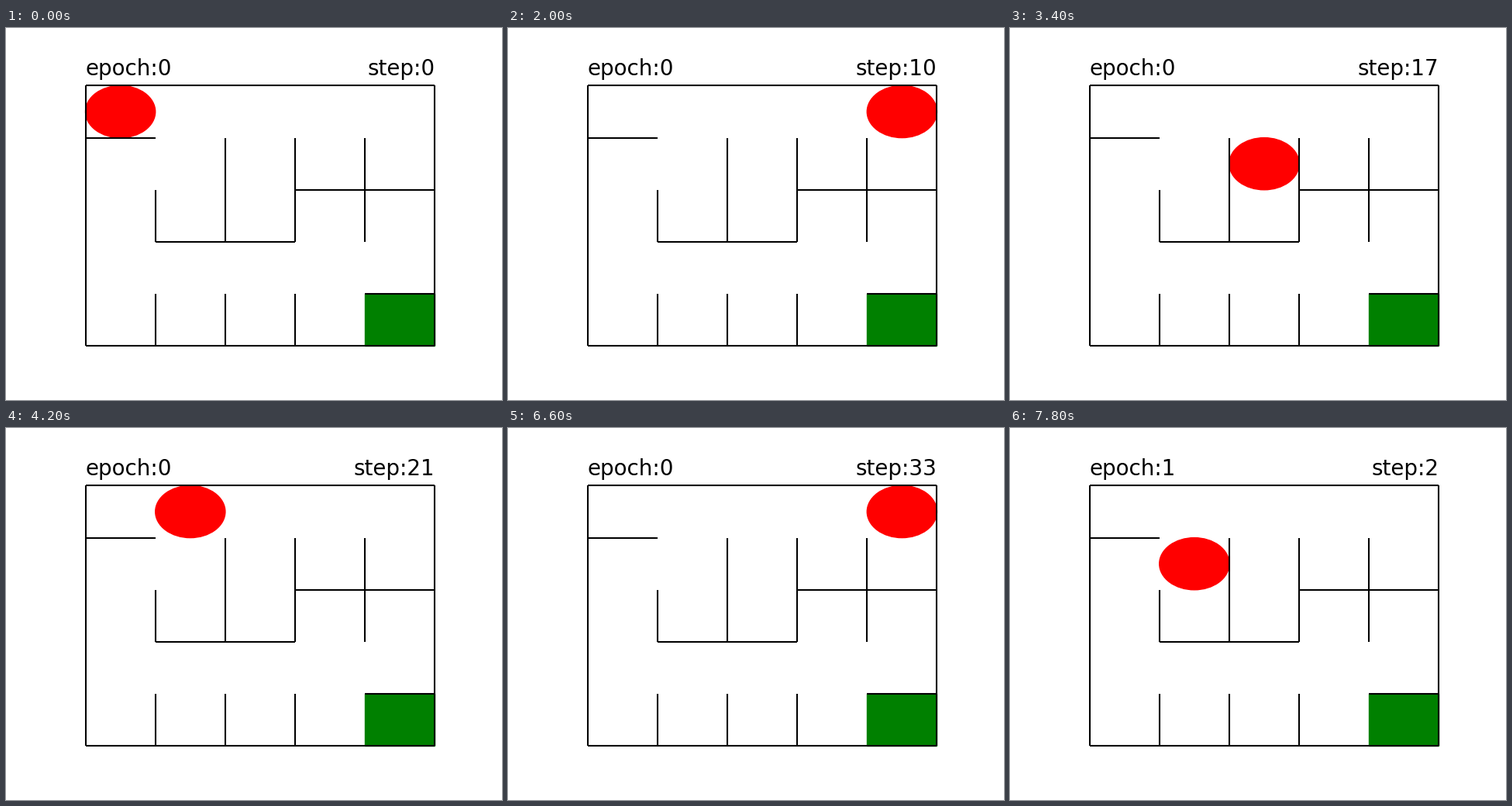
A matplotlib script that plays this animation: 640 px wide and 480 px high, repeating every 8000 ms.

```python
import matplotlib.pyplot as plt
from matplotlib.animation import FuncAnimation
from matplotlib.patches import Circle, Rectangle

SIZE = 5
# One letter per step; "." is a bump into a wall.
EPOCHS = [
    ".R.R.R" "D.URDUL" ".L.D" ".U.L.L." "RRRRD..U..L.",
    "RD",
]
MOVES = {"R": (1, 0), "L": (-1, 0), "D": (0, 1), "U": (0, -1), ".": (0, 0)}

# (fixed coordinate, start, end)
H_WALLS = [(0, 0, 5), (1, 0, 1), (2, 3, 5), (3, 1, 3), (4, 4, 5), (5, 0, 5)]
V_WALLS = [(0, 0, 5), (1, 2, 3), (1, 4, 5), (2, 1, 3), (2, 4, 5),
           (3, 1, 3), (3, 4, 5), (4, 1, 3), (5, 0, 5)]


def walk(epochs):
    """List (epoch, step, column, row) for every state of every epoch."""
    states = []
    for epoch, moves in enumerate(epochs):
        x = y = 0
        states.append((epoch, 0, x, y))
        for step, move in enumerate(moves, 1):
            dx, dy = MOVES[move]
            x, y = x + dx, y + dy
            states.append((epoch, step, x, y))
    return states


STATES = walk(EPOCHS)

plt.rcParams["font.family"] = "DejaVu Sans"
fig = plt.figure(figsize=(6.4, 4.8), dpi=100, facecolor="white")
ax = fig.add_axes([0.125, 0.11, 0.775, 0.77])
ax.set_xlim(-0.05 * SIZE, 1.05 * SIZE)
ax.set_ylim(1.05 * SIZE, -0.05 * SIZE)
ax.axis("off")

ax.add_patch(Rectangle((SIZE - 1, SIZE - 1), 1, 1, color="green"))
agent = ax.add_patch(Circle((0.5, 0.5), 0.5, color="red"))
for y, x0, x1 in H_WALLS:
    ax.hlines(y, x0, x1, color="black", lw=1.5)
for x, y0, y1 in V_WALLS:
    ax.vlines(x, y0, y1, color="black", lw=1.5)

epoch_label = ax.text(0, -0.2, "", fontsize=20, ha="left", va="baseline")
step_label = ax.text(SIZE, -0.2, "", fontsize=20, ha="right", va="baseline")


def draw(i):
    epoch, step, x, y = STATES[i]
    agent.center = (x + 0.5, y + 0.5)
    epoch_label.set_text(f"epoch:{epoch}")
    step_label.set_text(f"step:{step}")
    return agent, epoch_label, step_label


anim = FuncAnimation(fig, draw, frames=len(STATES), interval=200,
                     init_func=lambda: draw(0), repeat=True, repeat_delay=0)
plt.show()
```
